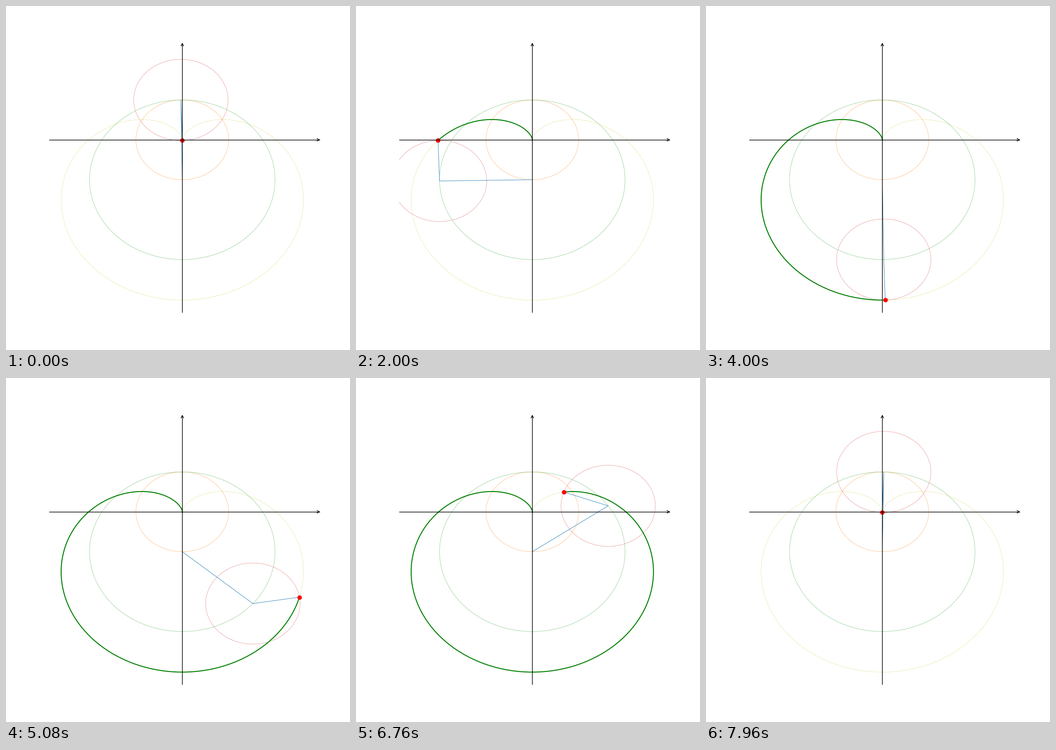
A matplotlib script for the animation above (8 s loop, 748 by 748 pixels).

```python
import numpy as np
import matplotlib.pyplot as plt
from matplotlib.animation import FuncAnimation
from mpl_toolkits import axisartist

SIZE = 748
FRAMES = 200
ROLL = 1.017                    # rolling circle, base circle has radius 1

turn = np.linspace(0, 2 * np.pi, 400)


def circle(cx, cy, r):
    return cx + r * np.cos(turn), cy + r * np.sin(turn)


def roll_center(a):
    return -2 * np.sin(a), 2 * np.cos(a) - 1


def pen(a):
    cx, cy = roll_center(a)
    return cx + ROLL * np.sin(2 * a), cy - ROLL * np.cos(2 * a)


fig = plt.figure(figsize=(SIZE / 100, SIZE / 100), dpi=100, facecolor="white")
ax = fig.add_subplot(axes_class=axisartist.Axes)
ax.axis[:].set_visible(False)
for name, direction in (("x", 0), ("y", 1)):
    ax.axis[name] = ax.new_floating_axis(direction, 0)
    ax.axis[name].set_axisline_style("->", size=1.0)
    ax.axis[name].toggle(ticks=False, ticklabels=False, label=False)

# The view holds the cardioid and the topmost wheel plus a small margin
half_w = 1.1 * pen(turn)[0].max()
half_h = 1.1 * (2 + ROLL)
ax.set_xlim(-half_w, half_w)
ax.set_ylim(-1 - half_h, -1 + half_h)


def line(x, y, color, width, **kw):
    return ax.plot(x, y, color=color, lw=width, **kw)[0]


line(*pen(turn), "y", 0.2)
line(*circle(0, 0, 1), "C1", 0.3)
line(*circle(0, -1, 2), "C2", 0.3)

wheel = line([], [], "C3", 0.27)
rods = line([], [], "C0", 0.6)
trace = line([], [], "green", 1.5)
dot, = ax.plot([], [], "o", color="red", ms=6)

angles = 2 * np.pi * (np.arange(FRAMES) + 0.5) / FRAMES
path_x, path_y = pen(angles)


def update(k):
    cx, cy = roll_center(angles[k])
    px, py = path_x[k], path_y[k]
    wheel.set_data(*circle(cx, cy, ROLL))
    rods.set_data([0, 0, cx, px], [0, -1, cy, py])
    dot.set_data([px], [py])
    n = (k + 1) % FRAMES        # the trail clears on the last step
    trace.set_data(path_x[:n], path_y[:n])
    return wheel, rods, trace, dot


anim = FuncAnimation(fig, update, frames=FRAMES, interval=40,
                     repeat=True, repeat_delay=0, blit=False)
plt.show()
```
